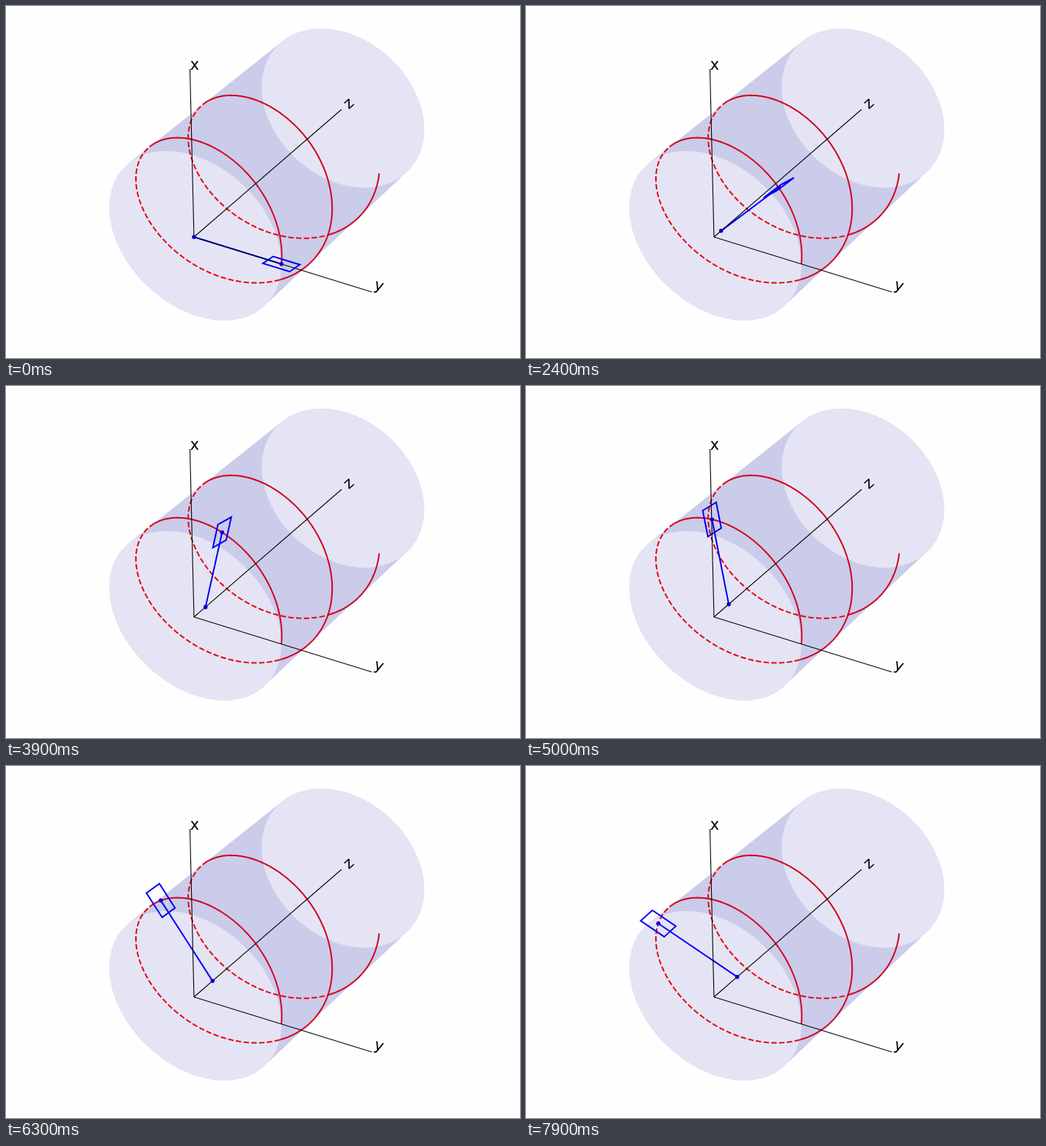
Recreate the animation shown at these times as an HTML page. Size 700x480 px, loop 8000 ms.

```html
<!DOCTYPE html>
<html lang="en">
<head>
<meta charset="utf-8">
<title>Helix on a cylinder</title>
<style>
  html, body { margin: 0; width: 100%; height: 100%; overflow: hidden; background: #fefefe; }
  svg { display: block; }
  path { fill: none; stroke-linejoin: round; }
  .body { fill: #cbcbea; }
  .cap { fill: #e4e4f4; }
  .near { stroke: #d0021f; stroke-width: 2; }
  .far { stroke: #e6000f; stroke-width: 2; stroke-dasharray: 7.4 3.2; }
  .blue { stroke: #0000f2; stroke-width: 2; stroke-linejoin: miter; }
  .axis { stroke: #000; stroke-width: 1.1; }
  circle { fill: #0000d8; }
  text { font: 20.8px "DejaVu Sans", sans-serif; text-anchor: middle; }
</style>
</head>
<body>
<svg width="700" height="480" viewBox="0 0 700 480">
  <g id="scene"></g>
  <path id="arm" class="blue"/>
  <path id="frame" class="blue"/>
  <g id="axes"></g>
  <circle id="hub" r="2.8"/>
  <circle id="tip" r="2.8"/>
  <text transform="translate(257 81)" y="5.7">x</text>
  <text transform="translate(507.3 384) rotate(17)" y="3.6">y</text>
  <text transform="translate(467 133.3) rotate(-41)" y="5.7">z</text>
</svg>
<script>
const LENGTH = 3;               // cylinder length in radii
const RISE = 1 / (2 * Math.PI); // helix rise per radian
const STEP_MS = 100, STEP_DEG = 2, LOOP_MS = 8000;
const el = id => document.getElementById(id);
const rad = deg => deg * Math.PI / 180;

// Perspective view of a point given in cylinder radii.
function project([x, y, z]) {
  const d = z / LENGTH;
  const w = 1 - 0.022 * x - 0.017 * y + 0.09 * d;
  return [
    256 + (-2.63 * x + 117 * y + 219.1 * d) / w,
    315 + (-109.5 * x + 36.2 * y - 189.7 * d) / w
  ];
}

const rim = (deg, z) => [Math.sin(rad(deg)), Math.cos(rad(deg)), z];
const helix = deg => rim(deg, RISE * rad(deg));

function toPath(points, closed) {
  const list = points.map(p => project(p).map(v => v.toFixed(2)).join(" "));
  return "M" + list.join("L") + (closed ? "Z" : "");
}

function sweep(from, to, pointAt) {
  const n = Math.ceil(Math.abs(to - from) / 2);
  return Array.from({ length: n + 1 }, (_, i) => pointAt(from + (to - from) * i / n));
}

function addPath(parent, cls, points, closed) {
  const path = document.createElementNS("http://www.w3.org/2000/svg", "path");
  path.setAttribute("class", cls);
  path.setAttribute("d", toPath(points, closed));
  el(parent).append(path);
}

const front = deg => rim(deg, 0);
const back = deg => rim(deg, LENGTH);

addPath("scene", "body", [...sweep(138, 321, front), ...sweep(-39, 138, back)], true);
addPath("scene", "cap", sweep(0, 360, front), true);
addPath("scene", "cap", sweep(0, 360, back), true);

for (const [cls, from, to] of [
  ["far", 133, 300], ["far", 493, 660],
  ["near", 0, 133], ["near", 300, 493], ["near", 660, 720]
]) addPath("scene", cls, sweep(from, to, helix));

for (const end of [[2, 0, 0], [0, 2, 0], [0, 0, LENGTH]])
  addPath("axes", "axis", [[0, 0, 0], end]);

function moveDot(id, point) {
  const [x, y] = project(point);
  el(id).setAttribute("cx", x);
  el(id).setAttribute("cy", y);
}

// The rectangle spans the normal and binormal of the helix.
function pose(deg) {
  const tip = helix(deg);
  const [s, c, z] = tip;
  const hub = [0, 0, z];
  const norm = Math.hypot(1, RISE);
  const normal = [s, c, 0];
  const binormal = [-RISE * c / norm, RISE * s / norm, 1 / norm];
  const corners = [[-1, -1], [-1, 1], [1, 1], [1, -1]].map(([a, b]) =>
    tip.map((v, i) => v + 0.15 * a * normal[i] + 0.1 * b * binormal[i]));
  el("arm").setAttribute("d", toPath([hub, tip]));
  el("frame").setAttribute("d", toPath(corners, true));
  moveDot("hub", hub);
  moveDot("tip", tip);
}

const start = performance.now();
function tick() {
  const t = (performance.now() - start) % LOOP_MS;
  pose(Math.floor(t / STEP_MS) * STEP_DEG);
  requestAnimationFrame(tick);
}
tick();
</script>
</body>
</html>
```
